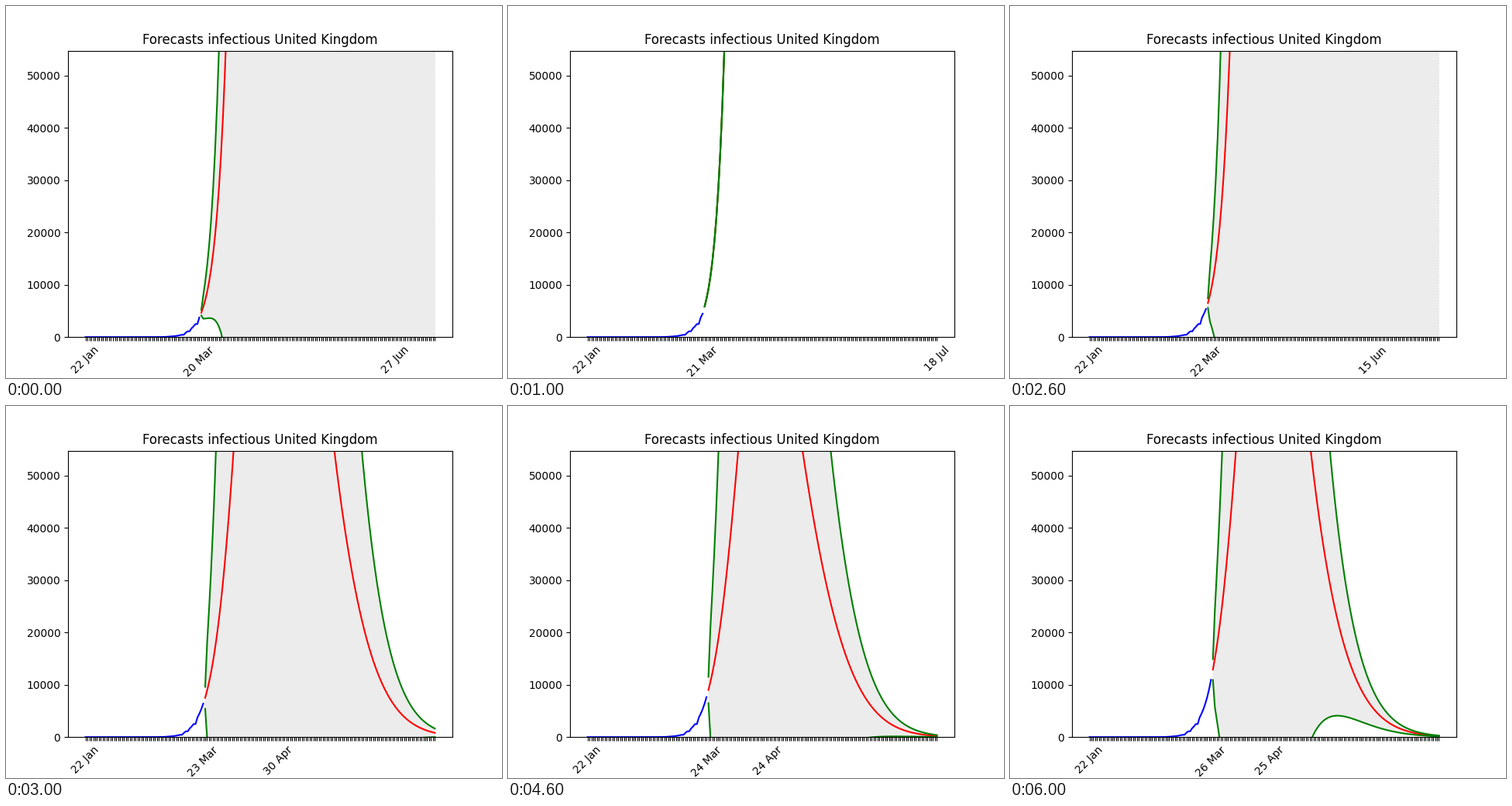
Write a matplotlib script that moves like this. It is 640 by 480 pixels and loops after 7000 ms.

```python
import numpy as np
import matplotlib.pyplot as plt
from matplotlib.animation import FuncAnimation

HORIZON = 120          # forecast length in days
FIRST_N = 59           # days of data behind the first forecast
MONTHS = [("Jan", 31), ("Feb", 29), ("Mar", 31), ("Apr", 30),
          ("May", 31), ("Jun", 30), ("Jul", 31)]


def count_cases():
    """Exponential growth between key days, with three days of no news."""
    counts = np.exp(np.interp(
        np.arange(65), [0, 38, 43, 49, 52, 58, 64],
        np.log([.5, 15, 107, 430, 1101, 3741, 10945])))
    for day in (50, 53, 57):
        counts[day] = counts[day - 1]
    return counts


cases = count_cases()
TOP = 5 * cases[-1]

# Times are in days after the forecast starts.
#   peak: tick of the highest value
#   rise: start value, time of reaching the top
#   band: relative half width at the start, time when it equals the mean
#   fall: time of leaving the top, last value, decay rate at the top
#   narrow: time when the half width equals the mean again, decay time
forecasts = [
    dict(peak=158, rise=(4650, 12.44), band=(.115, 10.6)),
    dict(peak=179, rise=(5850, 10.08)),
    dict(peak=146, rise=(6500, 11.26), band=(.14, 3.3)),
    dict(peak=100, rise=(7500, 14.7), band=(.28, .95),
         fall=(66.9, 810, .056), narrow=(120.5, 107)),
    dict(peak=94, rise=(9000, 15.5), band=(.28, 1.05),
         fall=(49, 215, .0445), narrow=(86, 172)),
    dict(peak=101, rise=(10600, 12.7), band=(.226, 1.55),
         fall=(67.9, 900, .056), narrow=(109, 129)),
    dict(peak=95, rise=(12900, 12.1), band=(.155, 3.4),
         fall=(51.5, 215, .0584), narrow=(52.3, 66)),
]


def date_label(day):
    day += 22
    for name, length in MONTHS:
        if day <= length:
            return f"{day:02d} {name}"
        day -= length


def rising(t, start, t_top, bend):
    return start * np.exp(np.log(TOP / start) * t / t_top
                          + bend / 2 * t * (t_top - t))


def falling(t, t_top, end, rate):
    span = HORIZON - 1 - t_top
    bend = (np.log(TOP / end) - rate * span) / span ** 2
    s = t - t_top
    return TOP * np.exp(-rate * s - bend * s ** 2)


def predict(f):
    """Mean and half width of the band for each forecast day."""
    t = np.arange(HORIZON)
    start, t_top = f["rise"]
    early = t <= t_top + 1.5
    mean = np.full(HORIZON, 3 * TOP)
    mean[early] = rising(t[early], start, t_top, .005 if "fall" in f else .002)
    ratio = np.zeros(HORIZON)
    if "band" in f:
        first, t_full = f["band"]
        ratio = first + (1 - first) * np.sqrt(t / t_full)
    if "fall" in f:
        late = t >= f["fall"][0] - 1.5
        mean[late] = falling(t[late], *f["fall"])
        t_full, tau = f["narrow"]
        ratio[late] = np.exp((t_full - t[late]) / tau)
    return mean, mean * ratio


fig, ax = plt.subplots(figsize=(6.4, 4.8), dpi=100)


def draw(i):
    ax.clear()
    f = forecasts[i]
    n = FIRST_N + i
    total = n + HORIZON
    days = np.arange(n, total)
    mean, half = predict(f)
    low, high = mean - half, mean + half

    ax.plot(np.arange(n), cases[:n], color="blue")
    ax.plot(days, mean, color="red")
    ax.plot(days, low, color="green")
    ax.plot(days, high, color="green")
    if half.any():
        ax.fill_between(days, low, high, color="gray", alpha=.15, linestyle=":")

    # Forecast dates begin with the last day of data.
    labels = [""] * total
    labels[0] = date_label(0)
    labels[n - 1] = date_label(n - 1)
    labels[f["peak"]] = date_label(f["peak"] - 1)
    ax.set_xticks(np.arange(total), labels, rotation=45)
    margin = .05 * (total - 1)
    ax.set_xlim(-margin, total - 1 + margin)
    ax.set_ylim(0, TOP)
    ax.set_title("Forecasts infectious United Kingdom")
    return []


anim = FuncAnimation(fig, draw, frames=len(forecasts), interval=1000,
                     repeat=True, repeat_delay=0)
plt.show()
```
